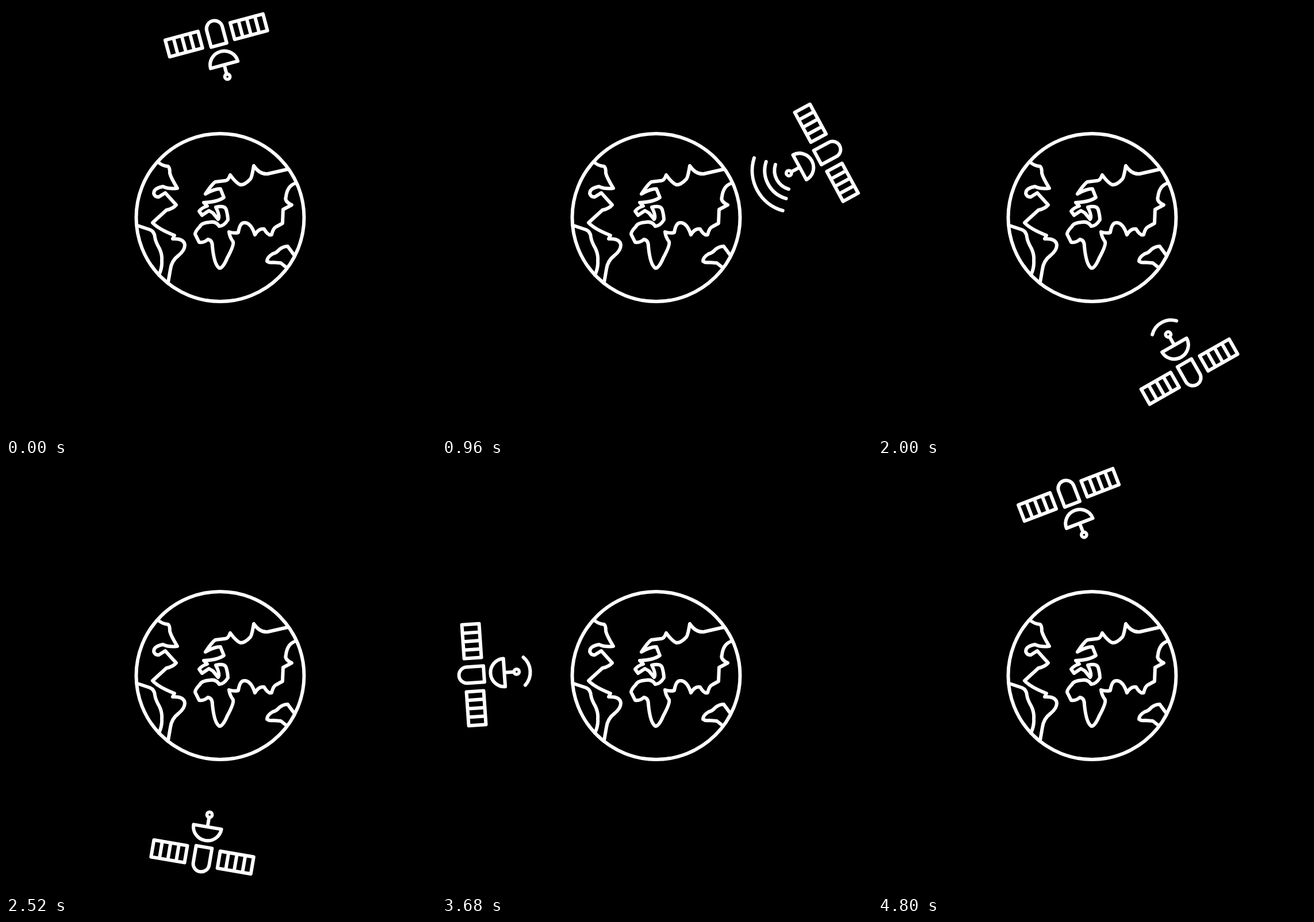
These frames come from a looping animation (748x748 px, 4.84 s). An HTML page:

```html
<!DOCTYPE html>
<html lang="en">
<head>
<meta charset="utf-8">
<title>Satellite orbit</title>
<style>
  html, body { margin: 0; width: 100%; height: 100%; overflow: hidden; background: #000; }
  svg { display: block; width: 100vw; height: 100vh; }
</style>
</head>
<body>
<svg viewBox="0 0 748 748" fill="none" stroke="#fff" stroke-width="6" stroke-linecap="round" stroke-linejoin="round">
  <g id="earth">
    <circle cx="372.5" cy="368" r="146"/>
    <!-- Americas -->
    <path d="M264 271Q271 278 282 279Q285 281 285 291Q287 299 298 317Q284 319 273 314Q257 317 257 326Q259 333 266 332L277 325L296 346Q290 353 279 355L255 377Q265 388 293 399L290 405Q310 404 311 416Q311 425 300 434Q288 443 286 458L282 481"/>
    <path d="M229 382L250 389Q258 392 259 402Q260 410 267 422Q272 433 271 443Q272 455 266 468"/>
    <!-- Northern coast and Europe -->
    <path d="M490 284L455 292Q441 293 431 278Q427 302 424 302Q416 311 408 311Q401 309 390 294Q386 305 380 304L364 306Q358 310 347 327Q362 318 373 318L379 333Q368 341 344 342L350 348Q340 351 336 357L341 364L353 356L360 360L369 371Q373 366 365 350Q380 346 383 354Q386 365 386 372Q379 383 371 383"/>
    <!-- Africa and southern Asia -->
    <path d="M371 383Q365 374 355 376Q340 377 337 384Q329 392 329 397L336 411Q345 412 351 406Q359 407 359 418Q362 450 371 456Q377 457 385 438Q397 416 395 410Q389 402 388 393Q397 396 404 394Q407 377 414 377Q426 376 433 398Q440 386 449 388Q456 400 462 398Q465 386 470 384L481 378L482 354L497 346Q484 340 487 332Q489 313 504 308"/>
    <!-- Australia -->
    <path d="M501 433L490 418Q482 418 475 424Q470 430 464 431Q454 437 454 444Q458 447 464 446L478 447L488 455"/>
  </g>
  <g id="sat">
    <path id="panels"/>
    <path d="M-14 17.5V-12A14 14 0 0 1 14 -12V17.5Z"/>
    <path d="M-24.5 53A24.5 24 0 0 1 24.5 53ZM0 53V70"/>
    <circle cy="74.4" r="4.6" stroke-width="5.6"/>
  </g>
</svg>
<script>
const LOOP = 4840, TURN = 4880, STEP = 40;
const CX = 372.5, CY = 368, ORBIT = 317;

// time, extra tilt, extra orbit angle (degrees on top of steady rotation)
const drift = [
  [0, 0, 0], [520, 0.5, -1.2], [1400, 11.6, 0.6], [2000, 17.8, 1.4],
  [2440, 18.9, 1], [3040, 16.4, 0.1], [3680, 9.6, 0], [4800, -0.2, -0.3]
];

// radius and the [on, off] spans of each signal arc
const signals = [
  { r: 33.7, spans: [[440, 2200], [3560, 4720]] },
  { r: 50.7, spans: [[680, 1660], [3800, 4640]] },
  { r: 72.5, spans: [[920, 1500], [4040, 4560]] }
];

const sat = document.getElementById('sat');

function panel(x, w, h, cells) {
  let d = `M${x} ${-h / 2}h${w}v${h}h${-w}z`;
  for (let i = 1; i < cells; i++) d += `M${x + w * i / cells} ${-h / 2}v${h}`;
  return d;
}
document.getElementById('panels').setAttribute('d', panel(-88, 59, 30, 4) + panel(29, 59, 30, 4));

for (const s of signals) {
  const half = 46 * Math.PI / 180;
  const x = s.r * Math.sin(half), y = 64.5 + s.r * Math.cos(half);
  s.el = document.createElementNS('http://www.w3.org/2000/svg', 'path');
  s.el.setAttribute('d', `M${-x} ${y}A${s.r} ${s.r} 0 0 0 ${x} ${y}`);
  sat.append(s.el);
}

function key(i) {
  const n = drift.length, lap = Math.floor(i / n);
  const [t, ...v] = drift[i - lap * n];
  return [t + lap * TURN, ...v];
}

// smooth periodic curve through one column of the table
function curve(t, col) {
  let i = 0;
  while (key(i + 1)[0] <= t) i++;
  const [p, a, b, q] = [i - 1, i, i + 1, i + 2].map(key);
  const span = b[0] - a[0], u = (t - a[0]) / span;
  const m0 = (b[col] - p[col]) / (b[0] - p[0]) * span;
  const m1 = (q[col] - a[col]) / (q[0] - a[0]) * span;
  const u2 = u * u, u3 = u2 * u;
  return (2 * u3 - 3 * u2 + 1) * a[col] + (u3 - 2 * u2 + u) * m0
       + (3 * u2 - 2 * u3) * b[col] + (u3 - u2) * m1;
}

function draw(t) {
  const turn = 360 * t / TURN;
  const orbit = turn - 1.2 + curve(t, 2);
  const tilt = turn - 15 + curve(t, 1);
  sat.setAttribute('transform',
    `translate(${CX} ${CY}) rotate(${orbit}) translate(0 ${-ORBIT}) rotate(${tilt - orbit})`);
  for (const s of signals) {
    const on = s.spans.some(([from, to]) => t >= from && t < to);
    s.el.setAttribute('visibility', on ? 'visible' : 'hidden');
  }
}

const start = performance.now();
function tick() {
  const t = (performance.now() - start) % LOOP;
  draw(Math.floor(t / STEP) * STEP);
  requestAnimationFrame(tick);
}
tick();
</script>
</body>
</html>
```
